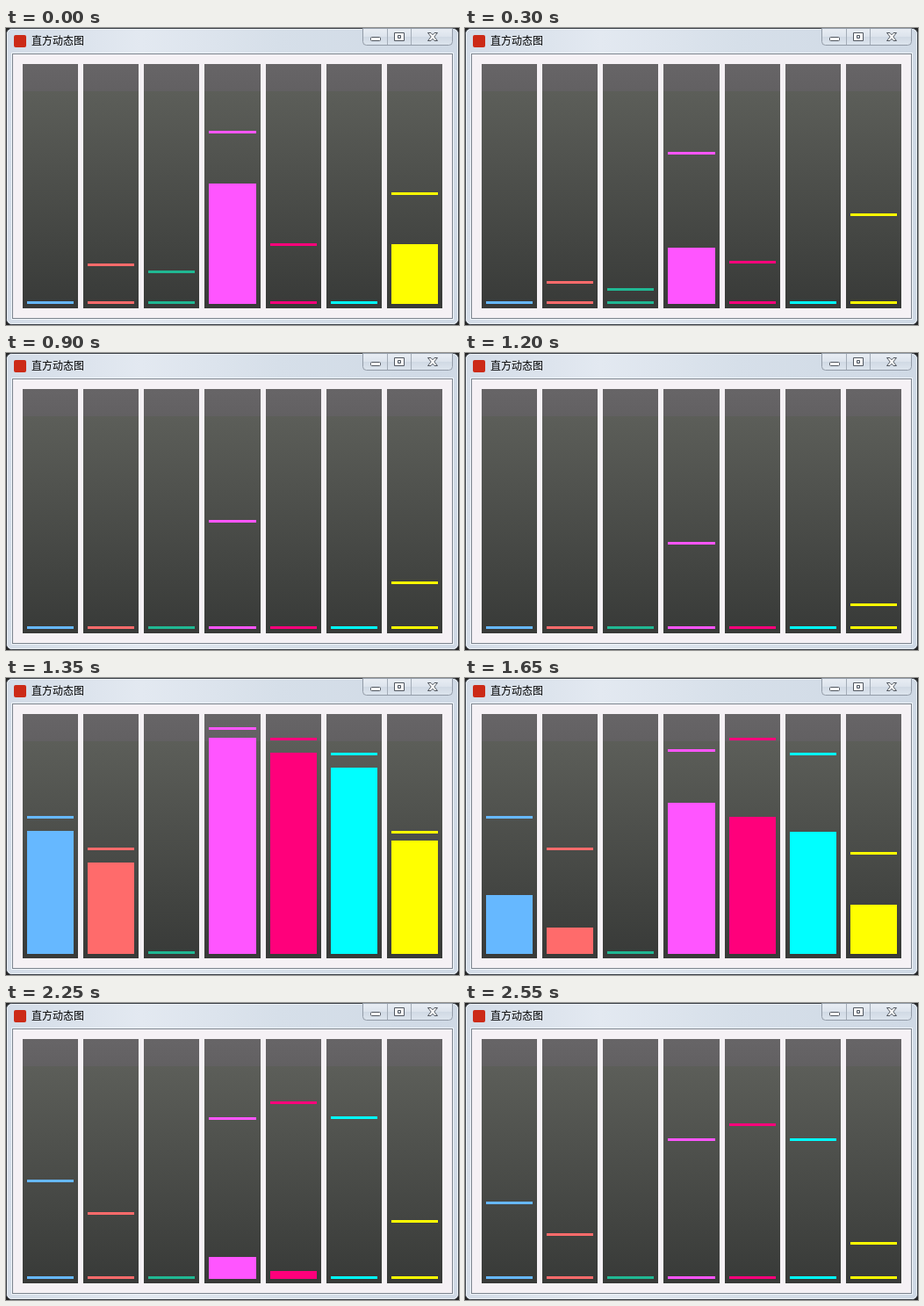
These frames come from a looping animation (516 by 338 pixels, 2.7 s). An HTML page:

```html
<!DOCTYPE html>
<html lang="zh">
<head>
<meta charset="utf-8">
<style>
html, body { margin: 0; width: 100%; height: 100%; overflow: hidden; background: #222; }
svg { display: block; }
text { font: 12px "Noto Sans CJK SC", "Noto Sans CJK", sans-serif; }
</style>
</head>
<body>
<svg width="516" height="338" viewBox="0 0 516 338">
  <defs>
    <linearGradient id="glass" x1="0" y1="0" x2="1" y2="0">
      <stop offset="0" stop-color="#d3dce7"/>
      <stop offset=".3" stop-color="#e3e9f1"/>
      <stop offset=".6" stop-color="#d6dfe9"/>
      <stop offset="1" stop-color="#cfd9e5"/>
    </linearGradient>
    <linearGradient id="track" x1="0" y1="0" x2="0" y2="1">
      <stop offset="0" stop-color="#676567"/>
      <stop offset=".112" stop-color="#626062"/>
      <stop offset=".112" stop-color="#5c5e59"/>
      <stop offset="1" stop-color="#383a38"/>
    </linearGradient>
    <linearGradient id="button" x1="0" y1="0" x2="0" y2="1">
      <stop offset="0" stop-color="#e9eef4"/>
      <stop offset=".5" stop-color="#dce3ec"/>
      <stop offset=".5" stop-color="#d0d9e4"/>
      <stop offset="1" stop-color="#dde5ee"/>
    </linearGradient>
  </defs>

  <rect x=".5" y=".5" width="515" height="337" rx="6" fill="url(#glass)" stroke="#3b4148"/>
  <rect x="1.5" y="1.5" width="513" height="335" rx="5" fill="none" stroke="#f4f8fb" stroke-opacity=".8"/>
  <rect x="6.5" y="28.5" width="503" height="303" fill="none" stroke="#eef3f8"/>
  <rect x="7.5" y="29.5" width="501" height="301" fill="#f5f1f5" stroke="#7b838d"/>

  <rect x="9" y="8" width="14" height="14" rx="2" fill="#cc2a17"/>
  <text x="29" y="19">直方动态图</text>

  <path d="M406.500 .5V15.500q0 4 4 4H504.500q4 0 4-4V.5Z" fill="url(#button)" stroke="#929ba7"/>
  <path d="M434.500 1V19M461.500 1V19" stroke="#a3acb7"/>
  <g fill="#fff" stroke="#50565f">
    <rect x="415.500" y="10.500" width="11" height="4" rx="1"/>
    <path fill-rule="evenodd" d="M442.500 5.500h11v9h-11ZM446.500 8.500v3h3v-3Z"/>
    <path d="M480.500 5.500h3.500l2 2.300 2-2.300h3.500l-3.700 4.500 3.700 4.500h-3.500l-2-2.300-2 2.300h-3.500l3.700-4.500Z"/>
  </g>
  <g id="chart"></g>
</svg>
<script>
const STEP = 150, STEPS = 18, HALF = 9;
const FLOOR = 311, BASE = 314, FALL = 12.25;

// Per column: colour, then [bar top, cap top] for each half of the loop.
const columns = [
  ["#66b8ff", [311, 311], [174.3, 157.2]],
  ["#ff6b6b", [311, 268.5], [210.5, 193.3]],
  ["#20b893", [311, 276], [311, 311]],
  ["#ff55ff", [177, 117.3], [68.5, 56.9]],
  ["#ff007b", [311, 245.5], [85.2, 68.1]],
  ["#00ffff", [311, 311], [102, 85.2]],
  ["#ffff00", [246.2, 187.3], [185.2, 174]]
];
const freeCaps = [3, 6];

const chart = document.getElementById("chart");

function addRect(x, right, y, bottom, fill) {
  const r = document.createElementNS("http://www.w3.org/2000/svg", "rect");
  const attrs = { x, y, width: right - x, height: bottom - y, fill };
  for (const key in attrs) r.setAttribute(key, attrs[key]);
  return chart.appendChild(r);
}

const parts = columns.map(([color], i) => {
  const at = x => Math.round(x + 69.16 * i);
  addRect(at(19), at(82.1), 41, 319, "url(#track)");
  const add = () => addRect(at(24), at(77.1), FLOOR, BASE, color);
  return { bar: add(), cap: add() };
});

// Held caps wait, then start with a shorter step.
function capFall(i, n, hold) {
  if (freeCaps.includes(i)) return FALL * n;
  return n > hold ? 8 + FALL * (n - hold - 1) : 0;
}

const clampTop = y => Math.min(FLOOR, Math.floor(y));

function draw(now) {
  const step = Math.floor(now / STEP) % STEPS;
  const half = Math.floor(step / HALF), n = step % HALF;
  columns.forEach((column, i) => {
    const [barTop, capTop] = column[1 + half];
    const y = clampTop(barTop + 3 * FALL * n);
    parts[i].bar.setAttribute("y", y);
    parts[i].bar.setAttribute("height", BASE - y);
    parts[i].cap.setAttribute("y", clampTop(capTop + capFall(i, n, 2 * half)));
  });
}

const start = performance.now();
function tick() {
  draw(performance.now() - start);
  requestAnimationFrame(tick);
}
tick();
</script>
</body>
</html>
```
